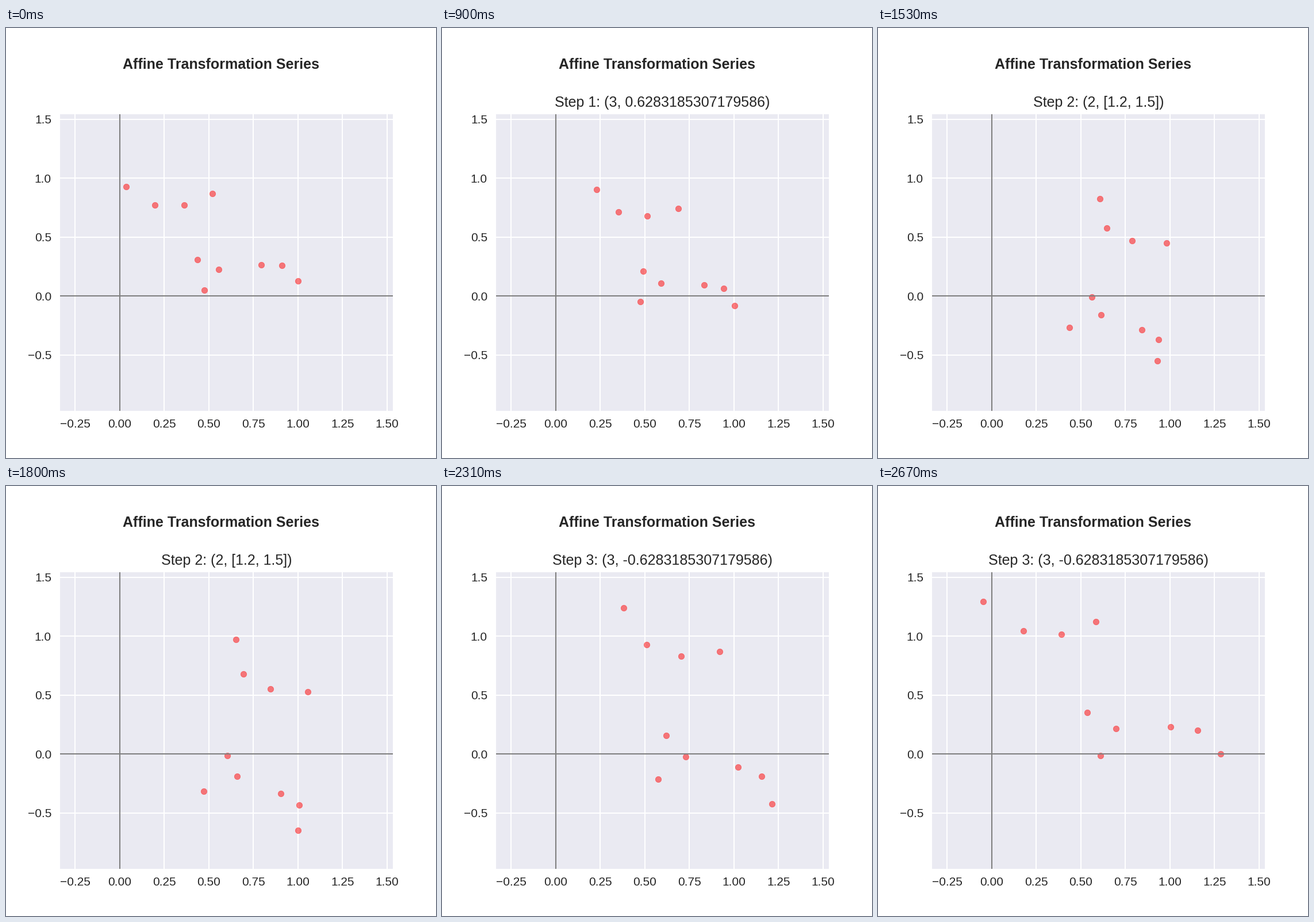
Write a matplotlib script that moves like this. It is 748 px wide and 748 px high and loops after 2.7 s.

```python
import numpy as np
import matplotlib.pyplot as plt
from matplotlib.animation import FuncAnimation

FRAMES, INTERVAL = 90, 30
DPI, SIZE = 150, 748
INK = "0.15"

POINTS = np.array([
    (0.036, 0.930), (0.197, 0.772), (0.361, 0.773), (0.519, 0.8685),
    (0.436, 0.307), (0.554, 0.227), (0.4745, 0.052), (0.793, 0.266),
    (0.9085, 0.2594), (0.999, 0.128),
])

NONE, SCALE, ROTATE = 0, 2, 3
STEPS = [
    (NONE, 0),
    (ROTATE, np.pi / 5),
    (SCALE, [1.2, 1.5]),
    (ROTATE, -np.pi / 5),
]
SPAN = FRAMES / len(STEPS)


def apply(pts, step, part=1.0):
    """Apply the given part of one transformation to row vectors."""
    kind, value = step
    if kind == ROTATE:
        c, s = np.cos(value * part), np.sin(value * part)
        return pts @ np.array([[c, -s], [s, c]])
    if kind == SCALE:
        return pts * (1 + (np.array(value) - 1) * part)
    return pts


plt.rcParams.update({
    "font.family": "Liberation Sans",
    "text.color": INK,
    "axes.labelcolor": INK,
    "xtick.color": INK,
    "ytick.color": INK,
})

fig = plt.figure(figsize=(SIZE / DPI, SIZE / DPI), dpi=DPI, facecolor="white")
fig.subplots_adjust(left=0.125, right=0.9, bottom=0.11, top=0.8)
fig.suptitle("Affine Transformation Series", y=0.93, fontsize=12, fontweight="bold")

ax = fig.add_subplot(facecolor="#EAEAF2")
ax.set(xlim=(-0.337, 1.533), ylim=(-0.9723, 1.5454))
ax.set_xticks(np.arange(-0.25, 1.51, 0.25))
ax.set_yticks(np.arange(-0.5, 1.51, 0.5))
ax.tick_params(length=0, pad=7, labelsize=10)
ax.set_axisbelow(True)
ax.grid(color="white", linewidth=1)
ax.spines[:].set_visible(False)
ax.axhline(0, color="gray", linewidth=1)
ax.axvline(0, color="gray", linewidth=1)

dots = ax.scatter(*POINTS.T, s=25, color="red", alpha=0.5, linewidths=0.3, zorder=1)
title = ax.set_title("", fontsize=12, pad=6)


def update(i):
    # A step boundary keeps the previous picture.
    if i and i % SPAN == 0:
        i -= 1
    n, part = int(i // SPAN), i % SPAN / SPAN
    pts = POINTS
    for step in STEPS[:n]:
        pts = apply(pts, step)
    dots.set_offsets(apply(pts, STEPS[n], part))
    kind, value = STEPS[n]
    title.set_text(f"Step {n}: ({kind}, {value})" if i else "")
    return dots, title


anim = FuncAnimation(fig, update, frames=FRAMES, interval=INTERVAL,
                     repeat=True, repeat_delay=0, blit=False)
plt.show()
```
